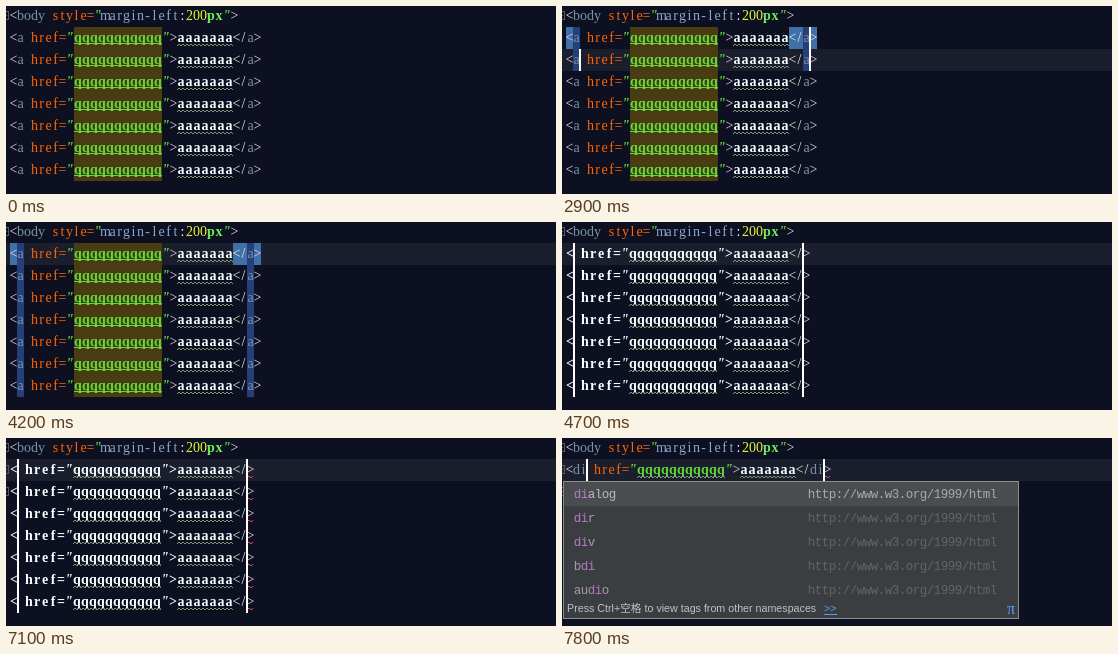
These frames come from a looping animation (550x188 px, 8000 ms). An HTML page with a canvas:

```html
<!DOCTYPE html>
<html lang="en">
<head>
<meta charset="utf-8">
<title>Editing several tags at once</title>
<style>
  html, body { margin: 0; width: 100%; height: 100%; overflow: hidden; background: #0c1021; }
  canvas { display: block; }
</style>
</head>
<body>
<canvas id="stage" width="550" height="188"></canvas>
<script>
const ctx = document.getElementById('stage').getContext('2d');
const LOOP = 8000, LEFT = 4, TOP = 21, ROW = 22, ROWS = 7;
const CELL = 7, BOLD_CELL = 8;
const CODE = '14px "Liberation Serif", serif';
const MENU = '12.5px "Liberation Mono", monospace';
const SANS = '10.7px "Liberation Sans", "Noto Sans CJK SC", sans-serif';
const C = {
  back: '#0c1021', line: '#1b1e2d', bracket: '#f0d5f0', slash: '#e2f5e0',
  tag: '#7a94a6', attr: '#ff6400', string: '#61d83c', prop: '#8da6ce',
  number: '#e6f03c', unit: '#6cf05a', text: '#f8fdff', inject: '#4a3c12', typo: '#7d9a72',
  error: '#e04a50', match: '#3f70a6', select: '#253f7a', caret: '#ffffff', fold: '#565a68'
};

// Times at which the editor takes on a new state; each entry extends the one before.
const STEPS = [
  [0, { mode: 'plain', rows: 0, active: 0, carets: false, match: false, mouse: null, fold: false }],
  [1000, { closeOnly: true, active: 1, carets: true, mouse: [44, 24] }],
  [1400, { closeOnly: false, rows: 1, match: true, mouse: null }],
  [1800, { mouse: [16, 7] }],
  [1900, { carets: false, mouse: [17, 9] }],
  [2400, { carets: true, mouse: null }],
  ...[2, 3, 4, 5, 6, 7].map(n => [2700 + n * 100, { rows: n, active: n }]),
  [4200, { carets: false, active: 1 }],
  [4700, { mode: 'broken', carets: true, match: false }],
  [5000, { fold: true }],
  [5700, { carets: false }],
  [6100, { carets: true }],
  [6600, { carets: false }],
  [7100, { carets: true }],
  [7300, { mode: 'typed', tag: 'd' }],
  [7800, { tag: 'di' }]
];

const LISTS = {
  d: ['data', 'datalist', 'del', 'details', 'dfn', 'dialog'],
  di: ['dialog', 'dir', 'div', 'bdi', 'audio']
};

function box(x, y, w, h, color) {
  ctx.fillStyle = color;
  ctx.fillRect(x, y, w, h);
}

// Sets text on the editor's character grid and returns where it ends.
function write(str, x, y, color, style = '', font = CODE) {
  const cell = style.includes('bold') ? BOLD_CELL : CELL;
  ctx.font = `${style} ${font}`;
  ctx.fillStyle = color;
  ctx.textAlign = 'center';
  [...str].forEach((ch, i) => ctx.fillText(ch, x + (i + 0.5) * cell, y));
  return x + str.length * cell;
}

function writer(x, y) {
  return (str, color, style) => { x = write(str, x, y, color, style); };
}

function squiggle(x, y, w, color) {
  ctx.strokeStyle = color;
  ctx.lineWidth = 1;
  ctx.beginPath();
  for (let i = 0; i <= w; i += 2) ctx.lineTo(x + i, y + (i % 4 ? -1 : 1));
  ctx.stroke();
}

function foldMark(y) {
  ctx.strokeStyle = C.fold;
  ctx.lineWidth = 1;
  ctx.strokeRect(-4.5, y - 4.5, 7, 8);
  box(0, y - 1, 1, 1, C.fold);
}

function caret(x, y) { box(x - 1, y, 2, ROW, C.caret); }

function iBeam([x, y]) {
  box(x, y, 1, 16, '#d8d8d8');
  box(x - 3, y, 7, 1, '#d8d8d8');
  box(x - 3, y + 16, 7, 1, '#d8d8d8');
}

function bodyLine() {
  const put = writer(LEFT, 14);
  put('<', C.bracket);
  put('body', C.tag);
  put(' style=', C.attr);
  put('"', C.string, 'italic bold');
  put('margin-left', C.prop);
  put(':', C.text);
  put('200', C.number);
  put('px', C.unit, 'bold');
  put('"', C.string, 'italic bold');
  put('>', C.bracket);
  foldMark(10);
}

function linkLine(n, s) {
  const y = TOP + (n - 1) * ROW;
  const broken = s.mode === 'broken', plain = s.mode === 'plain';
  const tag = broken ? '' : s.tag || 'a';
  const weight = broken ? 'bold' : '', cell = broken ? BOLD_CELL : CELL;
  const open = LEFT + cell, openEnd = open + tag.length * CELL;
  const valueX = openEnd + CELL + 5 * cell + BOLD_CELL;
  const textX = valueX + 12 * BOLD_CELL + cell;
  const close = textX + 7 * BOLD_CELL + 2 * CELL;
  const closeEnd = close + tag.length * CELL;

  if (plain) {
    box(valueX, y, 88, ROW, C.inject);
    if (n === 1 && s.match) {
      box(LEFT, y, CELL, ROW, C.match);
      box(close - 2 * CELL, y, 2 * CELL, ROW, C.match);
      box(closeEnd, y, CELL, ROW, C.match);
    }
    if (n <= s.rows) box(open, y, CELL, ROW, C.select);
    if (n <= s.rows || (s.closeOnly && n === 1)) box(close, y, CELL, ROW, C.select);
  }

  const put = writer(LEFT, y + 15);
  const bracket = broken ? C.text : C.bracket;
  const value = broken ? C.text : C.string;
  put('<', bracket, weight);
  put(tag + ' ', C.tag);
  put('href=', broken ? C.text : C.attr, weight);
  put('"', value, 'italic bold');
  put('qqqqqqqqqqq', value, 'bold');
  put('"', value, 'italic bold');
  put('>', bracket, weight);
  put('aaaaaaa', C.text, 'bold');
  put('</', C.slash);
  put(tag, C.tag);
  put('>', C.bracket);

  if (plain) box(valueX, y + 16, 88, 1, C.string);
  else squiggle(valueX, y + 18, 88, C.typo);
  squiggle(textX, y + 18, 56, C.typo);
  if (s.fold) {
    squiggle(closeEnd, y + 18, 7, C.error);
    if (n <= 2) foldMark(y + 11);
  }

  if (!s.carets) return;
  const dragging = plain && s.rows > 1 && s.rows < ROWS;
  if (!plain || n <= s.rows) {
    if (!(dragging && n === 1)) caret(openEnd, y);
    caret(closeEnd, y);
  } else if (s.closeOnly && n === 1) caret(closeEnd, y);
}

function popup(typed) {
  const items = LISTS[typed], short = typed === 'di';
  const bottom = short ? 181 : 190;
  box(1, 43, 456, bottom - 43, '#8b8d8f');
  box(2, 44, 454, bottom - 45, '#3b3e40');
  box(2, 44, short ? 454 : 445, 24, '#4a4d4f');
  items.forEach((name, i) => {
    const y = 60 + i * 24, at = name.indexOf(typed), end = at + typed.length;
    const plainColor = i ? '#a39da6' : '#bdb7c0';
    write(name.slice(0, at), 12, y, plainColor, '', MENU);
    write(typed, 12 + at * CELL, y, '#b679c4', '', MENU);
    write(name.slice(end), 12 + end * CELL, y, plainColor, '', MENU);
    write('http://www.w3.org/1999/html', 246, y, i ? '#626567' : '#a8aaab', '', MENU);
  });
  if (!short) {
    box(447, 44, 8, 109, '#595c5e');
    return;
  }
  ctx.textAlign = 'left';
  ctx.font = SANS;
  ctx.fillStyle = '#c0c2c3';
  ctx.fillText('Press Ctrl+空格 to view tags from other namespaces', 5, 174);
  ctx.fillStyle = '#589df6';
  ctx.fillText('>>', 262, 174);
  box(262, 176, 13, 1, '#589df6');
  ctx.font = '16px "Liberation Serif", serif';
  ctx.fillText('π', 445, 176);
}

function draw(time) {
  const s = Object.assign({}, ...STEPS.filter(([at]) => at <= time).map(([, change]) => change));
  box(0, 0, 550, 188, C.back);
  if (s.active) box(0, TOP + (s.active - 1) * ROW, 550, ROW, C.line);
  bodyLine();
  for (let n = 1; n <= ROWS; n++) linkLine(n, s);
  if (s.mouse) iBeam(s.mouse);
  if (s.tag) popup(s.tag);
}

const start = performance.now();
function tick() {
  draw((performance.now() - start) % LOOP);
  requestAnimationFrame(tick);
}
tick();
</script>
</body>
</html>
```
